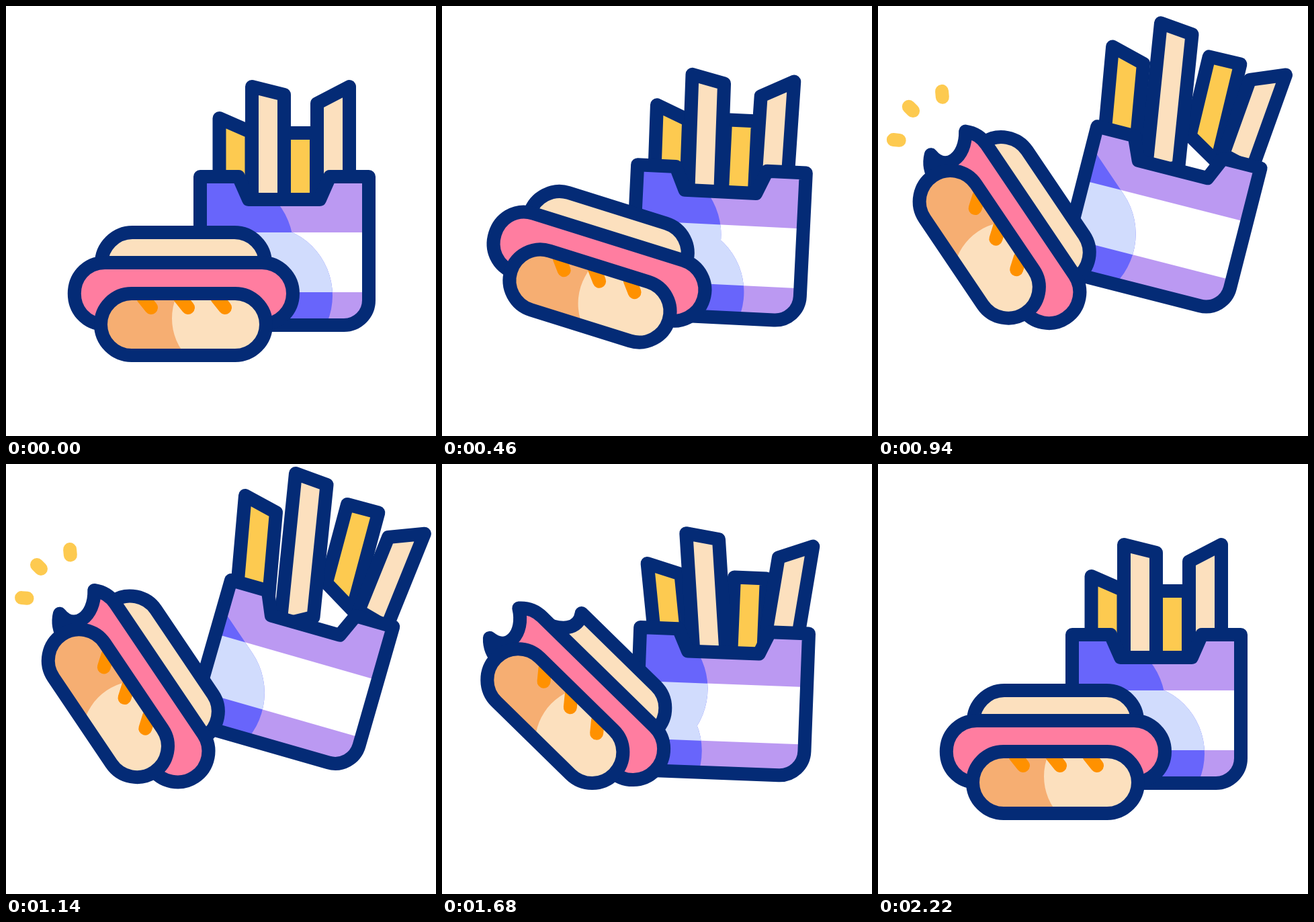
An HTML page with a canvas that plays this animation: 640x640 px, repeating every 2400 ms.

```html
<!DOCTYPE html>
<html lang="en">
<head>
<meta charset="utf-8">
<title>Hot dog and fries</title>
<style>
html, body { margin: 0; height: 100%; overflow: hidden; background: #fff; }
canvas { display: block; width: 100vw; height: 100vh; }
</style>
</head>
<body>
<canvas id="stage" width="640" height="640"></canvas>
<script>
const c = document.getElementById('stage').getContext('2d');
const NAVY = '#042b76', CREAM = '#fce0be', YELLOW = '#fdca50', PINK = '#ff7da0',
  TAN = '#f6ae72', ORANGE = '#ff9100', VIOLET = '#6865fb', LILAC = '#bb99f2', ICE = '#d1dcfd';
const LOOP = 2400, START = 220, LAND = 1900;
const BITES = [880, 1290];

// Poses are [x, y, degrees]. A part travels from rest by `move`, bowed by `bend` on the way out.
const box = { rest: [289, 254, 0], move: [46, -81, 16], bend: [-41, -24, 0], splay: [0, 0, 0], drop: 10 };

// Back to front. `left` and `right` are side lengths, `slant` lowers the top right corner;
// `splay` spreads a fry from `loose` on, `drop` is its dip at landing.
const fries = [
  { color: YELLOW, left: 150, right: 129, slant: 21, rest: [317.5, 167, 0],
    move: [38.5, -120, 5], bend: [-30, 10, 8], splay: [-18, 0, -6.5], loose: 1250, drop: 18 },
  { color: YELLOW, left: 121, right: 150, slant: 0, rest: [414, 189, 0],
    move: [94, -129, 15], bend: [-58, 20, 1], splay: [6, 0, 0], loose: 1440, drop: 27 },
  { color: CREAM, left: 118, right: 150, slant: -25, rest: [463, 145, 0],
    move: [106, -36, 22], bend: [-48, -31, 0], splay: [21, 0, 6], loose: 1440, drop: 11 },
  { color: CREAM, left: 227, right: 198, slant: 12, rest: [366, 120, 0],
    move: [65, -106, 5.8], bend: [-34, 3, 7], splay: [-13, 0, -4.5], loose: 1250, drop: 8 }
];

const clamp = v => Math.min(1, Math.max(0, v));
const mix = (a, b, k) => a + (b - a) * k;
const ramp = (t, from, to) => {
  const k = clamp((t - from) / (to - from));
  return k * k * (3 - 2 * k);
};
const pulse = (t, from, to) => Math.sin(Math.PI * clamp((t - from) / (to - from)));
const jolt = t => pulse(t, 1170, 1420);

function partPose(part, t, fallStart) {
  const out = ramp(t, START, 1122), k = out - ramp(t, fallStart, 1840);
  const bow = out * (1 - out);
  const splay = ramp(t, part.loose, part.loose + 220) * (1 - ramp(t, LAND, 2200));
  const drop = ramp(t, 1700, LAND) * (1 - ramp(t, LAND, 2180));
  const pose = part.rest.map((v, i) =>
    v + part.move[i] * k + part.bend[i] * bow + part.splay[i] * (splay || 0));
  pose[0] += 6 * jolt(t);
  pose[1] += part.drop * drop - 16 * jolt(t);
  return pose;
}

// The dog's position follows its tilt, plus a recoil after the first bite.
function dogPose(t) {
  const tilt = 56 * ramp(t, START, 870) - 4 * ramp(t, 1290, 1440) - 52 * ramp(t, 1537, 2134);
  const recoil = ramp(t, BITES[0], 960) * (1 - ramp(t, 1537, 1840));
  return [337 - 2.69 * tilt + 8 * recoil - 9 * jolt(t),
    472 - 1.185 * tilt + 10 * recoil + 18 * jolt(t), tilt];
}

function place([x, y, angle], ox = 0, oy = 0) {
  c.setTransform(1, 0, 0, 1, x, y);
  c.rotate(angle * Math.PI / 180);
  c.translate(-ox, -oy);
}
const placeDog = dog => place(dog, 337, 472);

function capsule(p, x1, x2, y, r) {
  p.moveTo(x1, y + r);
  p.arc(x1, y, r, Math.PI / 2, Math.PI * 1.5);
  p.arc(x2, y, r, -Math.PI / 2, Math.PI / 2);
  p.closePath();
  return p;
}

function outline(p) {
  c.strokeStyle = NAVY;
  c.lineWidth = 20;
  c.stroke(p);
}

function paint(p, color) {
  c.fillStyle = color;
  c.fill(p);
  outline(p);
}

const frontBun = capsule(new Path2D(), 187, 341, 474, 46);
const shadow = capsule(capsule(new Path2D(), 169, 322, 360, 106), 147, 382, 431, 104);

function fryShape({ left, right, slant }) {
  const p = new Path2D();
  p.lineTo(0, 0);
  p.lineTo(48, slant);
  p.lineTo(48, slant + right);
  p.lineTo(0, left);
  p.closePath();
  return p;
}

function boxShape(s) {
  const p = new Path2D();
  [[0, 221], [0, 0], [57, 0], [72, 34], [178, 34], [193, 0], [251, 0]]
    .forEach(([x, y]) => p.lineTo(x, y * s));
  p.arcTo(251, 221 * s, 0, 221 * s, 37);
  p.closePath();
  return p;
}

function bands(s, base, stripe) {
  c.fillStyle = base;
  c.fillRect(-20, -20, 300, 280);
  c.fillStyle = stripe;
  c.fillRect(-20, 83 * s, 300, 89 * s);
}

function drawBox(t, dog) {
  const pose = partPose(box, t, 1149);
  const s = 1 - .04 * ramp(t, 1200, 1450) * (1 - ramp(t, LAND, 2160));
  const shape = boxShape(s);
  c.save();
  place(pose);
  c.clip(shape);
  bands(s, LILAC, '#fff');
  placeDog(dog);
  c.clip(shadow);
  place(pose);
  bands(s, VIOLET, ICE);
  c.restore();
  place(pose);
  outline(shape);
}

// bite: 0 is whole, 1 is bitten
function backBun(bite) {
  const p = new Path2D(), m = (a, b) => mix(a, b, bite);
  p.moveTo(340, 337);
  p.lineTo(m(188, 185), 337);
  p.bezierCurveTo(m(163, 200), m(337, 358), m(142, 182), m(358, 378), m(142, 150), m(383, 388));
  p.lineTo(188, 429);
  p.lineTo(340, 429);
  p.arc(340, 383, 46, Math.PI / 2, -Math.PI / 2, true);
  p.closePath();
  return p;
}

function sausage(bite) {
  const p = new Path2D(), a = .74, r = 46;
  const x = 147 - r * Math.cos(a), dy = r * Math.sin(a);
  const bulge = mix(-15, 34, bite);
  p.arc(381, 428, r, Math.PI / 2, -Math.PI / 2, true);
  p.arc(147, 428, r, -Math.PI / 2, Math.PI + a, true);
  p.bezierCurveTo(x + bulge, 428 - dy * mix(.45, .3, bite),
    x + bulge, 428 + dy * mix(.45, .9, bite), x, 428 + dy);
  p.arc(147, 428, r, Math.PI - a, Math.PI / 2, true);
  p.closePath();
  return p;
}

function drawDog(dog, t) {
  const heal = 1 - ramp(t, 1820, 2020);
  const [first, second] = BITES.map(start => ramp(t, start, start + 50) * heal);
  placeDog(dog);
  paint(backBun(second), CREAM);
  paint(sausage(first), PINK);
  c.save();
  c.clip(frontBun);
  c.fillStyle = TAN;
  c.fillRect(130, 420, 270, 110);
  c.fillStyle = CREAM;
  c.beginPath();
  c.arc(331, 465, 84, 0, 7);
  c.rect(331, 420, 70, 110);
  c.fill();
  c.strokeStyle = ORANGE;
  c.lineWidth = 20;
  c.beginPath();
  for (const x of [216, 271, 326]) {
    c.moveTo(x - 12, 434);
    c.lineTo(x, 449);
  }
  c.stroke();
  c.restore();
  outline(frontBun);
}

function burst(x, y, angle, t, start) {
  const grow = pulse(t, start, start + 280);
  if (grow < .01) return;
  c.strokeStyle = YELLOW;
  c.lineWidth = 20 * Math.min(1, 3 * grow);
  for (const turn of [-40, 0, 40]) {
    place([x, y, angle + turn]);
    c.beginPath();
    c.moveTo(75 - 10 * grow, 0);
    c.lineTo(75 + 10 * grow, 0);
    c.stroke();
  }
}

function draw(now) {
  const t = now % LOOP, dog = dogPose(t);
  c.setTransform(1, 0, 0, 1, 0, 0);
  c.fillStyle = '#fff';
  c.fillRect(0, 0, 640, 640);
  c.lineCap = c.lineJoin = 'round';
  for (const fry of fries) {
    place(partPose(fry, t, 1210));
    paint(fryShape(fry), fry.color);
  }
  drawBox(t, dog);
  drawDog(dog, t);
  burst(102, 206, -135, t, BITES[0] + 20);
  burst(194, 223, -90, t, BITES[1] + 30);
  requestAnimationFrame(draw);
}
requestAnimationFrame(draw);
</script>
</body>
</html>
```
